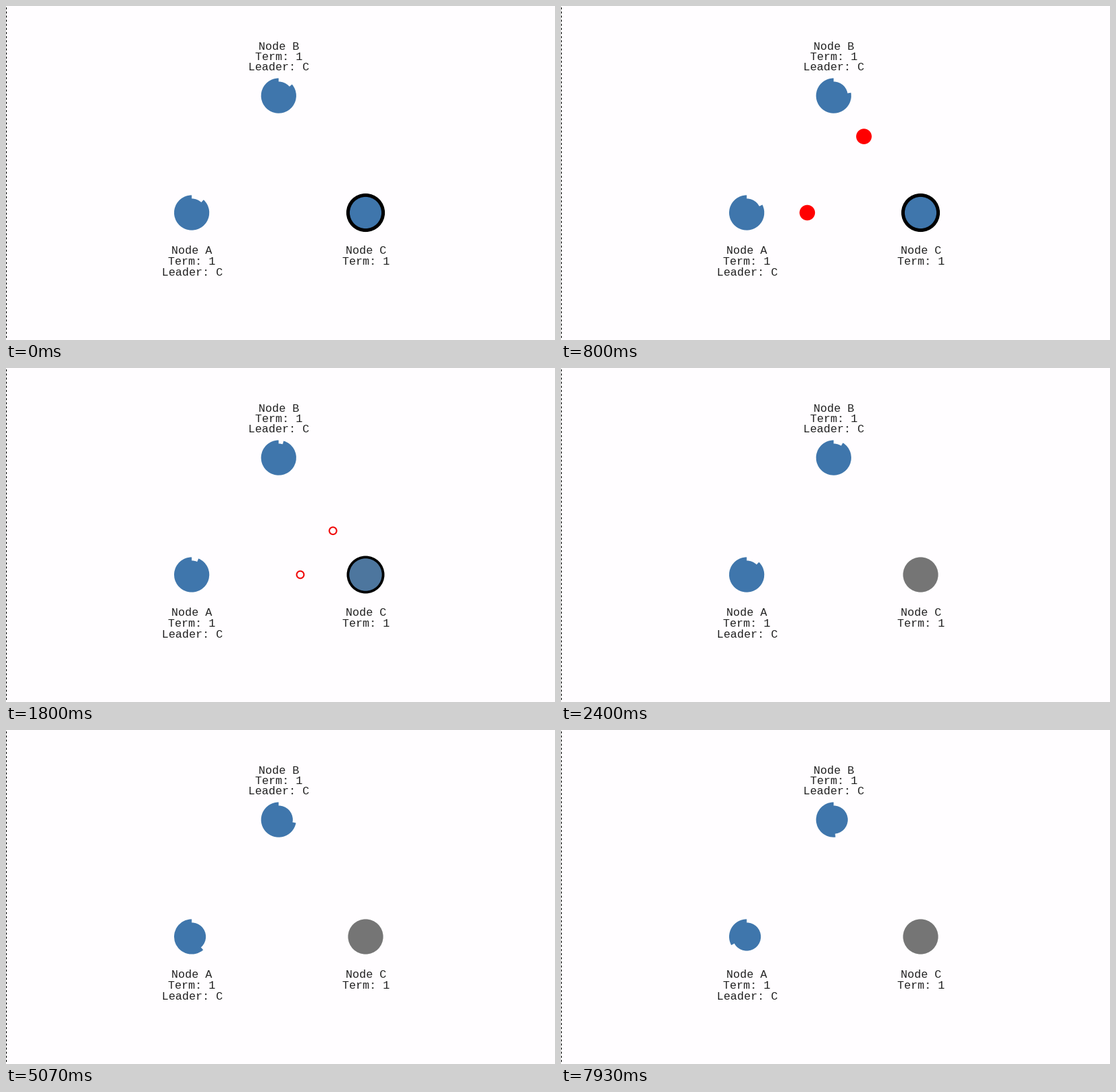
These frames come from a looping animation (800x488 px, 8 s). A matplotlib script:

```python
import numpy as np
import matplotlib.pyplot as plt
from matplotlib.animation import FuncAnimation
from matplotlib.patches import Circle, Rectangle, Wedge

W, H, DPI = 800, 488, 64
PT = 72 / DPI                      # points per pixel
LOOP, INTERVAL = 8000, 20
STEP = 200 / 3                     # the picture moves in ticks of this many ms

BG, BLUE, RED, INK = "#fffdff", "#3f76ac", "#ff0000", "#222222"
BLUE_RGB = np.array([63, 118, 172]) / 255
GREY_RGB = np.array([117, 117, 117]) / 255

A = np.array([270.6, 302.0])
B = np.array([397.3, 131.1])
C = np.array([524.0, 302.0])
R, R_CORE = 25.6, 20.6

SEND, TRAVEL = 130, 1028           # heartbeat departure and trip time
ARRIVE = SEND + TRAVEL
STOP, FADE = 1667, 333             # leader goes down

fig = plt.figure(figsize=(W / DPI, H / DPI), dpi=DPI, facecolor=BG)
ax = fig.add_axes([0, 0, 1, 1])
ax.set_xlim(0, W)
ax.set_ylim(H, 0)
ax.axis("off")


def label(x, baseline, lines):
    for i, line in enumerate(lines):
        ax.text(x + 0.4, baseline + 15.5 * i, line, ha="center", va="baseline",
                family="Liberation Mono", fontsize=16.5 * PT, color=INK)


def add_circle(center, radius, z, **style):
    return ax.add_patch(Circle(center, radius, zorder=z, **style))


def follower(center):
    """Core disc plus an outer ring that is eaten away clockwise."""
    add_circle(center, R_CORE, 3, fc=BLUE, lw=0)
    return ax.add_patch(Wedge(center, R, -90, 269.9, fc=BLUE, lw=0, zorder=3))


def timer_angle(t, start, rate, next_rate):
    if t < ARRIVE:
        return start + rate * t / 1000
    return next_rate * (t - ARRIVE) / 1000


def ease(p):
    p = min(max(p, 0), 1)
    return 4 * p ** 3 if p < 0.5 else 1 - 4 * (1 - p) ** 3


def place(dot, start, end, p):
    dot.set_visible(0 <= p < 1)
    dot.set_center(start + (end - start) * p)


# dashed border along the left edge
for y in range(2, H - 2, 6):
    ax.add_patch(Rectangle((0, y), 1, 3, fc="black", lw=0))

label(B[0], 63.5, ["Node B", "Term: 1", "Leader: C"])
label(A[0], 362.5, ["Node A", "Term: 1", "Leader: C"])
label(C[0], 362.5, ["Node C", "Term: 1"])

# ring, start angle, degrees per second before and after the heartbeat
timers = [(follower(A), 42.6, 25.5, 35.6),
          (follower(B), 49.6, 38.0, 25.7)]
leader = add_circle(C, R, 3, fc=BLUE, ec="black", lw=5 * PT)

beats = [(node, add_circle(C, 11.3, 2, fc=RED, lw=0)) for node in (A, B)]
replies = [(node, add_circle(node, 5.3, 2, fc="none", ec="#f00505", lw=2 * PT))
           for node in (A, B)]


def draw(i):
    t = (3 * i + 2) // 10 * STEP
    for ring, start, rate, next_rate in timers:
        ring.set_theta1(-90 + timer_angle(t, start, rate, next_rate))
        ring.set_theta2(270)
    for node, dot in beats:
        place(dot, C, node, (t - SEND) / TRAVEL)
    for node, dot in replies:
        place(dot, node, C, (t - ARRIVE) / TRAVEL)
    k = ease((t - STOP) / FADE)
    leader.set_facecolor(BLUE_RGB + (GREY_RGB - BLUE_RGB) * k)
    leader.set_linewidth(5 * PT * (1 - k))
    return []


anim = FuncAnimation(fig, draw, frames=LOOP // INTERVAL, interval=INTERVAL,
                     init_func=lambda: draw(0), repeat=True, repeat_delay=0)
plt.show()
```
